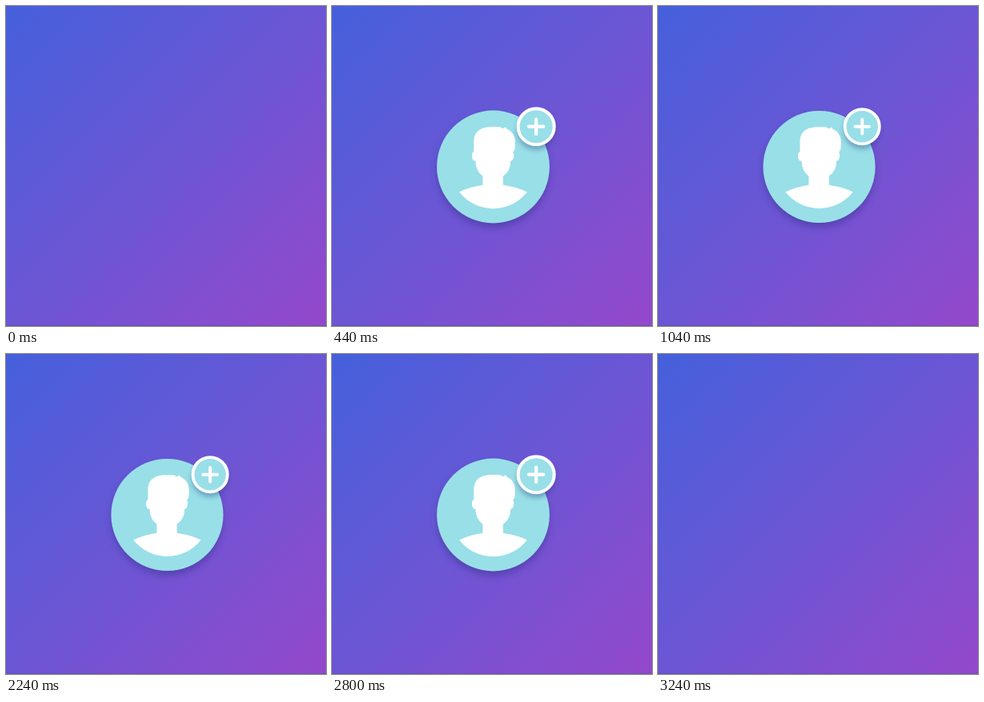
Write an HTML page that moves like this. It is 400x400 px and loops after 3.64 s.

```html
<!DOCTYPE html>
<html lang="en">
<head>
<meta charset="utf-8">
<title>Add contact</title>
<style>
  html, body { margin: 0; width: 100%; height: 100%; overflow: hidden; }
  svg { display: block; width: 100%; height: 100%; }
</style>
</head>
<body>
<svg viewBox="0 0 400 400">
  <defs>
    <linearGradient id="sky" x1="0" y1="0" x2="1" y2="1">
      <stop offset="0" stop-color="#4560dc"/>
      <stop offset=".5" stop-color="#6c56d4"/>
      <stop offset="1" stop-color="#9448cb"/>
    </linearGradient>
    <filter id="soft" x="-30%" y="-30%" width="160%" height="160%">
      <feGaussianBlur stdDeviation="4.5"/>
    </filter>
    <filter id="softSmall" x="-40%" y="-40%" width="180%" height="180%">
      <feGaussianBlur stdDeviation="3"/>
    </filter>
  </defs>

  <rect width="400" height="400" fill="url(#sky)"/>
  <rect y="399" width="400" height="1" fill="#5a4fa0" opacity=".5"/>

  <g id="avatar">
    <circle cy="4" r="70" fill="#2b2a80" opacity=".38" filter="url(#soft)"/>
    <circle cy="-2" r="70.1" fill="#99dfe8"/>
    <path fill="#fff" transform="translate(0 -2) scale(.789) translate(-201.5 -200.2)" d="
      M148 240 Q165 232 185 229 V215 Q174 207 173.5 191
      Q168 191 168 183 Q168 177 171 176 V162 Q170 139 196 137
      L210 137 Q214 137 216 140 Q219 139 221 137.5 Q222 140 224 141
      Q237 147 236 165 L235.5 172 Q234.5 176 232.5 177
      Q235 180 233.5 186 Q232 191 229 191 Q229 207 217 215
      V229 Q238 232 255 240 A68 68 0 0 1 148 240Z"/>
  </g>

  <g id="badge">
    <circle cy="5" r="23" fill="#24407c" opacity=".38" filter="url(#softSmall)"/>
    <circle r="21.6" fill="#99dfe8" stroke="#fff" stroke-width="3.8"/>
    <path d="M-8.8 0H8.8M0-8.8V8.8" stroke="#fff" stroke-width="4" stroke-linecap="round"/>
  </g>
</svg>

<script>
  const LOOP = 3640, STEP = 40, HOLD_START = 1040, HOLD_END = 2240, OUT_END = 3240;
  const PEAK = 1.268, RISE = 160, SETTLE = 480;

  const parts = [
    { node: document.getElementById('avatar'), x: 201.5, y: 203, delay: 0 },
    { node: document.getElementById('badge'), x: 255.2, y: 150.7, delay: 400 }
  ];

  const expoOut = p => p >= 1 ? 1 : 1 - 2 ** (-10 * p);

  // Pop past full size, then ease back to rest.
  function popScale(t) {
    if (t <= 0) return 0;
    if (t < RISE) return PEAK * expoOut(t / RISE);
    return PEAK + (1 - PEAK) * expoOut((t - RISE) / SETTLE);
  }

  // The exit plays the entrance backwards.
  function entranceTime(t) {
    if (t < HOLD_START) return t;
    return t < HOLD_END ? HOLD_START : Math.max(0, OUT_END - t);
  }

  function draw(now) {
    const t = entranceTime(Math.floor((now % LOOP) / STEP) * STEP);
    for (const { node, x, y, delay } of parts) {
      const scale = popScale(t - delay);
      node.setAttribute('visibility', scale ? 'visible' : 'hidden');
      node.setAttribute('transform', `translate(${x} ${y}) scale(${scale})`);
    }
  }

  const start = performance.now();
  function tick() {
    draw(performance.now() - start);
    requestAnimationFrame(tick);
  }
  tick();
</script>
</body>
</html>
```
